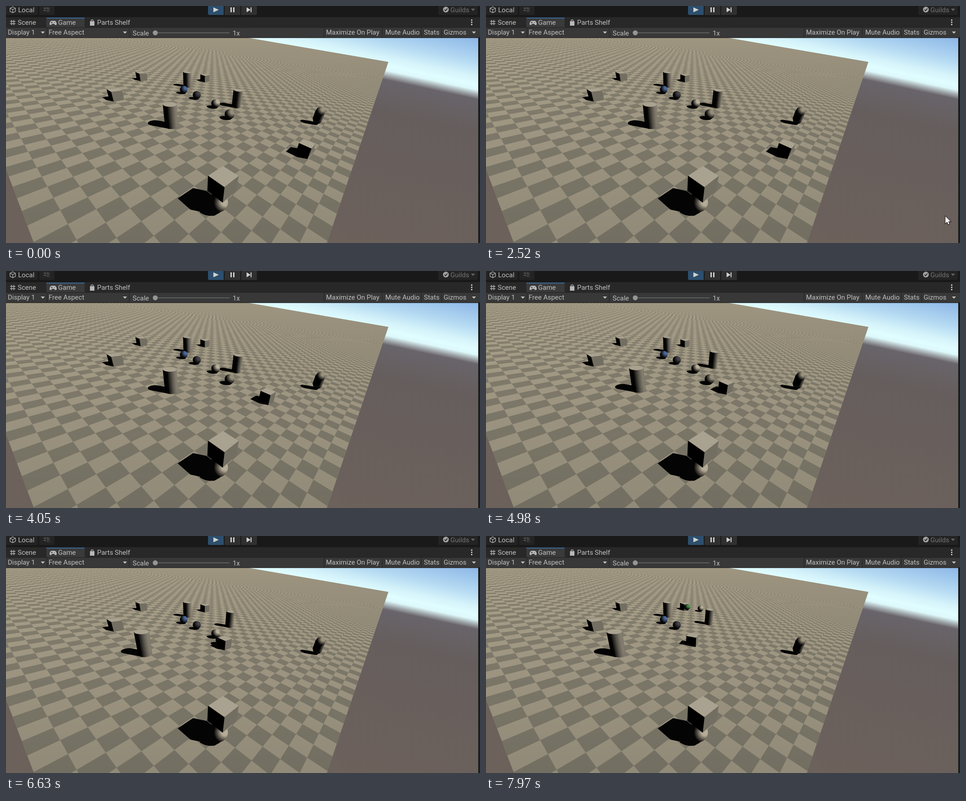
Write an HTML page with a canvas that moves like this. It is 1056 px wide and 530 px high and loops after 8 s.

```html
<!DOCTYPE html>
<html lang="en">
<head>
<meta charset="utf-8">
<title>Physics scene</title>
<style>
  html, body { margin: 0; width: 100%; height: 100%; overflow: hidden; background: #191919; }
  canvas, svg { position: absolute; left: 0; top: 0; width: 1056px; height: 530px; display: block; }
  text { font: 15px Roboto, Arial, sans-serif; fill: #c0c0c0; }
  .dim { fill: #747474; }
  .line { fill: none; stroke: #b8b8b8; stroke-width: 1.3; }
</style>
</head>
<body>
<canvas id="view" width="1056" height="530"></canvas>
<svg viewBox="0 0 1056 530">
  <path fill="#191919" d="M0 0H1056V25H0z"/>
  <path fill="#232323" d="M0 0H71V17Q71 20 68 20H0zM74 0H108V17Q108 20 105 20H77Q74 20 74 17zM963 0H1051V17Q1051 20 1048 20H966Q963 20 963 17z"/>
  <path fill="#2d4f6d" d="M450 0H485V20H453Q450 20 450 17z"/>
  <path fill="#303030" d="M487 0H522V20H487zM524 0H559V17Q559 20 556 20H524z"/>
  <path fill="#d0d0d0" d="M462 3L474 8.500L462 14zM500 3h3v11h-3zM506 3h3v11h-3zM536 3L545 8.500L536 14zM545 3h2v11h-2z"/>
  <path class="line" d="M15 2L21 5V12L15 15L9 12V5zM9 5L15 8L21 5M15 8V15"/>
  <path class="line" style="stroke:#555" d="M87 2V12M93 2V7M83 5H98M83 10H90M92 14V10Q92 8 94 8T96 10V14"/>
  <text x="27" y="14">Local</text>
  <circle cx="980" cy="8" r="6.500" fill="#a2a2a2"/>
  <path d="M977 8l2.500 2.500l4-5" fill="none" stroke="#252525" stroke-width="1.800"/>
  <text class="dim" x="990" y="14">Guilds</text>
  <path fill="#666" d="M1036 6h9l-4.500 5z"/>

  <path fill="#282828" d="M0 25H1056V48H0z"/>
  <path fill="#3a3a3a" d="M90 26H175V48H90z"/>
  <path fill="#3a679b" d="M90 26H175V28H90z"/>
  <path class="line" d="M12.500 31V43M17.500 31V43M9 34.500H21M9 39.500H21"/>
  <text x="26" y="42">Scene</text>
  <path fill="#b8b8b8" d="M101 33H109Q113 35 113 41Q111 45 107 40H103Q99 45 97 41Q97 35 101 33z"/>
  <path stroke="#3a3a3a" d="M100 37h4M102 35v4M107 37h2"/>
  <text x="116" y="42">Game</text>
  <path fill="#b8b8b8" d="M187 34H197V44H187z"/>
  <path class="line" d="M189.500 36V33Q189.500 31 192 31T194.500 33V36"/>
  <text x="203" y="42">Parts Shelf</text>
  <path fill="#c0c0c0" d="M1036 30h3v3h-3zM1036 35h3v3h-3zM1036 40h3v3h-3z"/>

  <path fill="#383838" d="M0 48H1056V70H0z"/>
  <path fill="#202020" d="M0 47.500H1056V48.500H0zM0 70H1056V71.500H0zM91 48h1v22h-1zM274 48h1v22h-1zM708 48h1v22h-1zM838 48h1v22h-1zM925 48h1v22h-1zM970 48h1v22h-1z"/>
  <text x="4" y="64">Display 1</text>
  <text x="95" y="64">Free Aspect</text>
  <text x="282" y="66">Scale</text>
  <path fill="#606060" d="M333 59H498V61H333z"/>
  <circle cx="332.500" cy="60" r="5.500" fill="#969696"/>
  <text x="505" y="66">1x</text>
  <text x="713" y="64">Maximize On Play</text>
  <text x="845" y="64">Mute Audio</text>
  <text x="931" y="64">Stats</text>
  <text x="975" y="64">Gizmos</text>
  <path fill="#c0c0c0" d="M77.500 57h9l-4.500 5zM260.500 57h9l-4.500 5zM1038 57h9l-4.500 5z"/>
</svg>
<script>
const ctx = document.getElementById('view').getContext('2d');
const W = 1056, H = 530, TOP = 71, LOOP = 8000;

// Camera: axes a and b lie in the floor, "up" is its normal, origin is below the eye.
const dot = (p, q) => p[0] * q[0] + p[1] * q[1] + p[2] * q[2];
const cross = (p, q) => [p[1] * q[2] - p[2] * q[1], p[2] * q[0] - p[0] * q[2], p[0] * q[1] - p[1] * q[0]];
const unit = v => v.map(c => c / Math.hypot(...v));
const CX = 526, CY = 301, EYE = 7.8;
const vanishA = [-156 - CX, -49 - CY], vanishB = [857 - CX, 110 - CY];
const F = Math.sqrt(-vanishA[0] * vanishB[0] - vanishA[1] * vanishB[1]);
const A = unit([...vanishA, F]), B = unit([...vanishB, F]), UP = cross(B, A);

const toCamera = (a, b, z) => A.map((c, i) => a * c + b * B[i] + (z - EYE) * UP[i]);
const project = (a, b, z) => {
  const c = toCamera(a, b, z);
  return [CX + F * c[0] / c[2], CY + F * c[1] / c[2]];
};
const lift = (x, y, z = 0) => {
  const ray = [x - CX, y - CY, F], t = (z - EYE) / dot(ray, UP);
  return [t * dot(ray, A), t * dot(ray, B), t];
};

const SHADOW = [0.68, -0.38];
const LIGHT = unit([-SHADOW[0], -SHADOW[1], 1]);
const clamp = v => Math.max(0, Math.min(1, v));
const mix = (p, q, k) => p + (q - p) * k;

const backdrop = document.createElement('canvas');
function paintBackdrop() {
  backdrop.width = W;
  backdrop.height = H;
  const g = backdrop.getContext('2d');
  const sky = g.createLinearGradient(875, 37, 768, 536);
  [[0, '#8fb9e8'], [.098, '#b4d9f2'], [.16, '#d5f3fa'], [.195, '#e0fdff'], [.217, '#dcf8fa'], [.235, '#a9b2b5'],
   [.257, '#68646a'], [.4, '#665e5d'], [1, '#6c615b']].forEach(s => sky.addColorStop(...s));
  g.fillStyle = sky;
  g.fillRect(0, TOP, W, H);

  const right = lift(715, 530)[0], near = lift(62, 530)[1], far = lift(852, 125)[1];
  const wave = v => 1 - Math.abs(((v % 2) + 2) % 2 - 1);
  const stripe = (v, w) => (wave(v + w / 2) - wave(v - w / 2)) / w;
  const image = g.createImageData(W, H - TOP);
  const light = [[178, 168, 144], [145, 138, 120]], dark = [[142, 134, 115], [114, 111, 98]];
  for (let y = TOP; y < H; y++) for (let x = 0; x < W; x++) {
    const [a, b, t] = lift(x + .5, y + .5);
    if (t <= 0) continue;
    const px = lift(x + 1.5, y + .5), py = lift(x + .5, y + 1.5);
    const wa = Math.max(Math.abs(px[0] - a), Math.abs(py[0] - a));
    const wb = Math.max(Math.abs(px[1] - b), Math.abs(py[1] - b));
    const cover = clamp((a - right) / wa + .5) * clamp((b - near) / wb + .5) * clamp((far - b) / wb + .5);
    const tone = .5 - .5 * stripe(a - right, wa * .85) * stripe(b - near, wb * .85);
    const depth = Math.pow((y - TOP) / (H - TOP), .6), i = 4 * ((y - TOP) * W + x);
    for (let c = 0; c < 3; c++)
      image.data[i + c] = mix(mix(dark[0][c], dark[1][c], depth), mix(light[0][c], light[1][c], depth), tone);
    image.data[i + 3] = 255 * cover;
  }
  const floor = document.createElement('canvas');
  floor.width = W;
  floor.height = H - TOP;
  floor.getContext('2d').putImageData(image, 0, 0);
  g.drawImage(floor, 0, TOP);
  g.fillStyle = '#1c1c1c';
  g.fillRect(1052, TOP, 4, H);
}

function polygon(points, fill, seam) {
  ctx.beginPath();
  points.forEach(p => ctx.lineTo(...p));
  ctx.closePath();
  ctx.fillStyle = fill;
  ctx.fill();
  if (seam) {
    ctx.strokeStyle = fill;
    ctx.lineWidth = .6;
    ctx.stroke();
  }
}

function hull(points) {
  const half = list => list.reduce((h, p) => {
    const bends = () => {
      const [q, r] = h.slice(-2);
      return (r[0] - q[0]) * (p[1] - q[1]) - (r[1] - q[1]) * (p[0] - q[0]) <= 0;
    };
    while (h.length > 1 && bends()) h.pop();
    h.push(p);
    return h;
  }, []);
  const sorted = points.sort((p, q) => p[0] - q[0] || p[1] - q[1]);
  return [...half(sorted), ...half([...sorted].reverse())];
}

const ring = (a, b, r, n, turn = 0) => Array.from({ length: n }, (_, i) => {
  const angle = turn + i * 2 * Math.PI / n;
  return [a + r * Math.cos(angle), b + r * Math.sin(angle), angle];
});
const shade = v => `rgb(${[215, 205, 183].map(c => Math.round(c * Math.max(0, v))).join()})`;

function prism(base, low, high, capped = true) {
  const n = base.length;
  base.forEach(([a, b, angle], i) => {
    const [a2, b2] = base[(i + 1) % n], m = angle + Math.PI / n;
    const normal = [Math.cos(m), Math.sin(m), 0];
    if (a * normal[0] + b * normal[1] >= 0) return;
    polygon([project(a, b, low), project(a2, b2, low), project(a2, b2, high), project(a, b, high)],
      shade(dot(normal, LIGHT)), true);
  });
  if (capped) polygon(base.map(p => project(p[0], p[1], high)), shade(LIGHT[2]));
}

function ball(a, b, z, color, [lx, ly, reach] = [.6, -.48, 1.35]) {
  const [x, y] = project(a, b, z), r = F * .5 / toCamera(a, b, z)[2];
  const g = ctx.createRadialGradient(x + lx * r, y + ly * r, 0, x + lx * r, y + ly * r, reach * r);
  g.addColorStop(0, color);
  g.addColorStop(.3, color);
  g.addColorStop(1, '#050505');
  ctx.beginPath();
  ctx.arc(x, y, r, 0, 7);
  ctx.fillStyle = g;
  ctx.fill();
}

const ringCloud = (base, ...levels) => levels.flatMap(z => base.map(p => [p[0], p[1], z]));
const ballCloud = (a, b, z) => [-1, -.6, -.2, .2, .6, 1].flatMap(s =>
  ringCloud(ring(a, b, .5 * Math.cos(s * 1.4), 12), z + .5 * Math.sin(s * 1.4)));
const square = (a, b, turn) => ring(a, b, Math.SQRT1_2, 4, Math.PI / 4 + turn);
const disc = (a, b) => ring(a, b, .52, 28);

const kinds = {
  cube: {
    draw: (a, b, z, { turn }) => prism(square(a, b, turn), z - .5, z + .5),
    cloud: (a, b, z, { turn }) => ringCloud(square(a, b, turn), z - .5, z + .5)
  },
  cylinder: {
    draw: (a, b) => prism(disc(a, b), 0, 2),
    cloud: (a, b) => ringCloud(disc(a, b), 0, 2)
  },
  capsule: {
    draw(a, b) {
      ball(a, b, .5, '#2a2824');
      prism(ring(a, b, .5, 28), .5, 1.5, false);
      ball(a, b, 1.5, '#988f7d');
    },
    cloud: (a, b) => [...ballCloud(a, b, .5), ...ballCloud(a, b, 1.5)]
  },
  ball: {
    draw: (a, b, z, { o, t }) => ball(a, b, z, o.recolor && t >= o.recolor[0] ? o.recolor[1] : o.color, o.glow),
    cloud: ballCloud
  }
};

// Paths hold [ms, x, y, turn] of each body's centre on screen; z is its height above the floor.
const still = (x, y) => [[0, x, y]];
const bodies = [
  { kind: 'cube', z: .5, path: still(302, 157) },
  { kind: 'cube', z: .5, path: still(244, 198) },
  { kind: 'cube', z: .5, path: [[7850, 443, 161], [7970, 442, 157.5]] },
  { kind: 'cube', z: 1.5, path: still(483, 397) },
  { kind: 'cube', z: .5, path: [[2850, 667, 319, 0], [3160, 641, 306, 0], [4050, 582, 280, 0], [5300, 518, 251, 0],
    [5780, 503, 244, 0], [7270, 475, 235, 0], [7970, 460, 232, -.5]] },
  { kind: 'cylinder', z: 1, path: still(404, 164.5) },
  { kind: 'cylinder', z: 1, path: [[4050, 367, 245], [4600, 348, 243], [5100, 335, 241.5], [5780, 320, 240],
    [6500, 308, 240], [7270, 298, 240], [7970, 291, 240]] },
  { kind: 'cylinder', z: 1, path: [[4050, 515, 207], [4600, 509, 201], [5100, 506, 197], [5780, 502, 192],
    [6500, 499, 187], [7270, 497, 182.5], [7970, 497, 181]] },
  { kind: 'capsule', z: 1, path: still(697, 245) },
  { kind: 'ball', z: .5, color: '#4d6898', path: still(396, 187) },
  { kind: 'ball', z: .5, color: '#45434a', path: still(425, 199) },
  { kind: 'ball', z: .5, color: '#b9ae9a', path: [[7200, 467, 218], [7270, 469, 207], [7970, 478, 162]] },
  { kind: 'ball', z: .5, color: '#968d7b', recolor: [7050, '#3f8f48'],
    path: [[5300, 498, 242], [5780, 486, 238], [7050, 473, 230], [7270, 467, 212], [7970, 448, 159]] },
  { kind: 'ball', z: .5, color: '#b5ab97', glow: [.7, 0, 1.1], path: still(472, 439) }
];

function at(path, t) {
  const next = path.findIndex(k => k[0] > t);
  if (next < 1) return path[next ? path.length - 1 : 0].slice(1);
  const p = path[next - 1], q = path[next], k = (t - p[0]) / (q[0] - p[0]);
  return p.slice(1).map((v, i) => mix(v, q[i + 1], k));
}

function shape(d, x, y) {
  ctx.save();
  ctx.translate(x, y);
  const path = new Path2D(d);
  ctx.lineWidth = 1.8;
  ctx.strokeStyle = '#000';
  ctx.stroke(path);
  ctx.fillStyle = '#fff';
  ctx.fill(path);
  ctx.restore();
}
const ARROW = 'M0 0V16L4 12.5L6.5 18L9 17L6.5 11.5H11.5Z';
const RESIZE = 'M0 0L5 -4.500V-1H12V-4.500L17 0L12 4.500V1H5V4.500Z';

function drawCursor(t) {
  if (t >= 440 && t < 1820) shape(RESIZE, ...at([[440, 1041, 526], [1210, 1041, 510]], t));
  if (t >= 2150 && t < 3770) shape(ARROW, ...at([[2150, 1046, 476], [2940, 998, 464]], t));
}

function draw(t) {
  ctx.drawImage(backdrop, 0, 0);
  const placed = bodies.map(o => {
    const [x, y, turn = 0] = at(o.path, t), [a, b] = lift(x, y, o.z);
    return { o, t, a, b, turn, z: o.z, kind: kinds[o.kind], depth: toCamera(a, b, o.z)[2] };
  }).sort((p, q) => q.depth - p.depth);
  for (const p of placed) {
    const cast = p.kind.cloud(p.a, p.b, p.z, p)
      .map(([a, b, z]) => project(a + z * SHADOW[0], b + z * SHADOW[1], 0));
    polygon(hull(cast), '#040404');
  }
  for (const p of placed) p.kind.draw(p.a, p.b, p.z, p);
  drawCursor(t);
}

paintBackdrop();
const start = performance.now();
function tick() {
  draw((performance.now() - start) % LOOP);
  requestAnimationFrame(tick);
}
tick();
</script>
</body>
</html>
```
